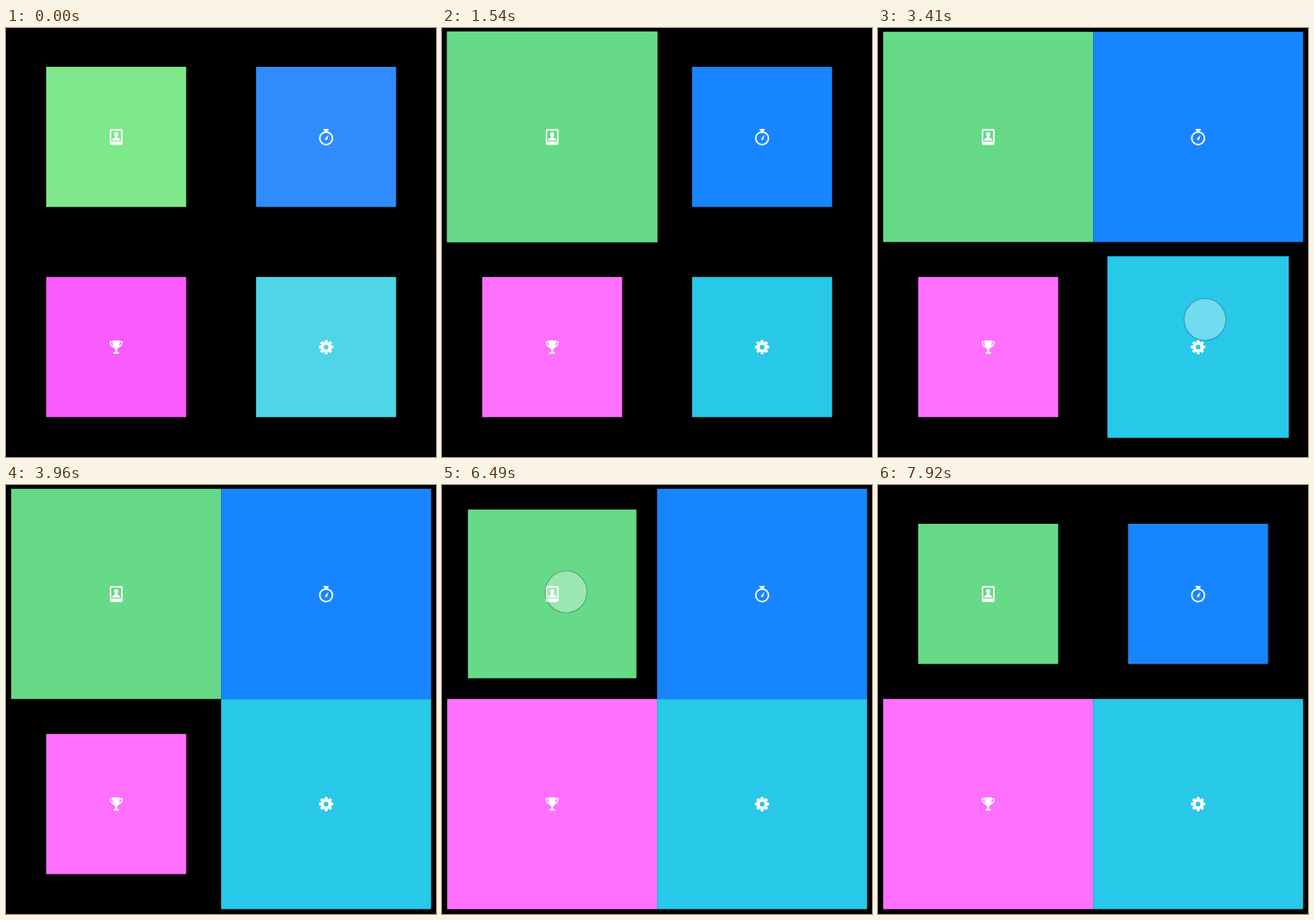
An HTML page with a canvas that plays this animation: 576x574 px, repeating every 8000 ms.

```html
<!DOCTYPE html>
<html lang="en">
<head>
<meta charset="utf-8">
<title>Expanding tiles</title>
<style>
  html, body { margin: 0; width: 100%; height: 100%; overflow: hidden; background: #000; }
  canvas { display: block; }
</style>
</head>
<body>
<canvas id="stage" width="576" height="574"></canvas>
<script>
const ctx = document.getElementById('stage').getContext('2d');

const LOOP = 8000;
const STEP = 110;       // the motion is stepped, not smooth
const SMALL = 187.5;
const LARGE = 281.25;
const RECOLOR = 880;

// Springy progress, one value per step after the tap takes effect
const SPRING = [0, 0.592, 0.988, 1.02, 1.018, 1.01, 1];

const tiles = [
  { x: 147.6, y: 145.7, early: '#7fe88b', color: '#66da87', icon: drawContact },
  { x: 428.8, y: 145.7, early: '#308cfd', color: '#1785ff', icon: drawStopwatch },
  { x: 147.6, y: 426.9, early: '#f95cfd', color: '#ff70ff', icon: drawTrophy },
  { x: 428.8, y: 426.9, early: '#50d4e8', color: '#28c8e8', icon: drawGear }
];

// down: touch appears, go: tile starts to resize
const taps = [
  { tile: 0, down: 880, go: 990, x: 172, y: 148 },
  { tile: 1, down: 2200, go: 2310, x: 452, y: 122 },
  { tile: 3, down: 3300, go: 3300, x: 438, y: 390 },
  { tile: 2, down: 4840, go: 4950, x: 179, y: 395 },
  { tile: 0, down: 6270, go: 6380, x: 166.3, y: 143 },
  { tile: 1, down: 7150, go: 7260, x: 447, y: 143 }
];

function springAt(t) {
  const i = Math.floor(t / STEP);
  return SPRING[Math.max(0, Math.min(i, SPRING.length - 1))];
}

function tileSize(index, t) {
  let size = SMALL, target = LARGE;
  for (const tap of taps) {
    if (tap.tile !== index || t < tap.go) continue;
    const from = size;
    size = from + (target - from) * springAt(t - tap.go);
    target = from;
  }
  return size;
}

function dot(x, y, r) {
  ctx.beginPath();
  ctx.arc(x, y, r, 0, Math.PI * 2);
}

function polygon(points) {
  ctx.beginPath();
  for (const [x, y] of points) ctx.lineTo(x, y);
  ctx.closePath();
  ctx.fill();
}

function drawContact() {
  ctx.beginPath();
  ctx.roundRect(-8.6, -10.5, 17.2, 21.2, 1.8);
  ctx.rect(-6.6, -8.4, 13.2, 14.6);
  ctx.fill('evenodd');
  ctx.beginPath();
  ctx.ellipse(0, -3.2, 2.7, 3.2, 0, 0, Math.PI * 2);
  ctx.fill();
  ctx.fillRect(-1.4, -1, 2.8, 3);
  ctx.beginPath();
  ctx.moveTo(-5.4, 5);
  ctx.bezierCurveTo(-5.4, 1.6, -3, 1.8, -1.4, 0.8);
  ctx.lineTo(1.4, 0.8);
  ctx.bezierCurveTo(3, 1.8, 5.4, 1.6, 5.4, 5);
  ctx.fill();
}

function drawStopwatch() {
  ctx.lineWidth = 2.1;
  dot(0, 1.9, 8.5);
  ctx.stroke();
  polygon([[-3.6, -10.8], [3.6, -10.8], [3.2, -8.8], [1.3, -7.6],
           [1.3, -6], [-1.3, -6], [-1.3, -7.6], [-3.2, -8.8]]);
  polygon([[3.2, -2.8], [1.5, 3.6], [-0.4, 4.5], [-1.4, 3.2], [-0.9, 1.7]]);
}

function drawTrophy() {
  ctx.beginPath();
  ctx.moveTo(-5, -8.8);
  ctx.lineTo(5, -8.8);
  ctx.bezierCurveTo(5, -1.5, 3.6, 1.6, 1.2, 3.4);
  ctx.lineTo(1.2, 6.2);
  ctx.lineTo(3.6, 7.2);
  ctx.lineTo(3.6, 8.8);
  ctx.lineTo(-3.6, 8.8);
  ctx.lineTo(-3.6, 7.2);
  ctx.lineTo(-1.2, 6.2);
  ctx.lineTo(-1.2, 3.4);
  ctx.bezierCurveTo(-3.6, 1.6, -5, -1.5, -5, -8.8);
  ctx.fill();
  ctx.lineWidth = 1.5;
  for (const side of [-1, 1]) {
    ctx.beginPath();
    ctx.moveTo(side * 4.6, -7.2);
    ctx.lineTo(side * 7.9, -7.2);
    ctx.bezierCurveTo(side * 8.2, -3.4, side * 6, -1, side * 2.8, 0.4);
    ctx.stroke();
  }
}

function drawGear() {
  ctx.beginPath();
  for (let i = 0; i < 8; i++) {
    const a = i * Math.PI / 4;
    for (const [turn, r] of [[-0.3, 7.2], [-0.2, 9.7], [0.2, 9.7], [0.3, 7.2]]) {
      ctx.lineTo(r * Math.cos(a + turn), r * Math.sin(a + turn));
    }
  }
  ctx.closePath();
  ctx.moveTo(3.2, 0);
  ctx.arc(0, 0, 3.2, 0, Math.PI * 2);
  ctx.fill('evenodd');
}

function drawTile(tile, index, t) {
  const size = tileSize(index, t);
  ctx.save();
  ctx.translate(tile.x, tile.y);
  ctx.fillStyle = t < RECOLOR ? tile.early : tile.color;
  ctx.fillRect(-size / 2, -size / 2, size, size);
  ctx.fillStyle = ctx.strokeStyle = '#fff';
  tile.icon();
  ctx.restore();
}

function drawTouch(tap, t) {
  if (t < tap.down || t >= tap.go + 2 * STEP) return;
  dot(tap.x, tap.y, 28);
  ctx.fillStyle = 'rgba(255,255,255,0.35)';
  ctx.fill();
  ctx.lineWidth = 1.2;
  ctx.strokeStyle = 'rgba(0,40,70,0.32)';
  ctx.stroke();
}

let start;
function frame(now) {
  start ??= now;
  const t = Math.floor((now - start) % LOOP / STEP) * STEP;
  ctx.fillStyle = '#000';
  ctx.fillRect(0, 0, 576, 574);
  tiles.forEach((tile, i) => drawTile(tile, i, t));
  taps.forEach(tap => drawTouch(tap, t));
  requestAnimationFrame(frame);
}
requestAnimationFrame(frame);
</script>
</body>
</html>
```
